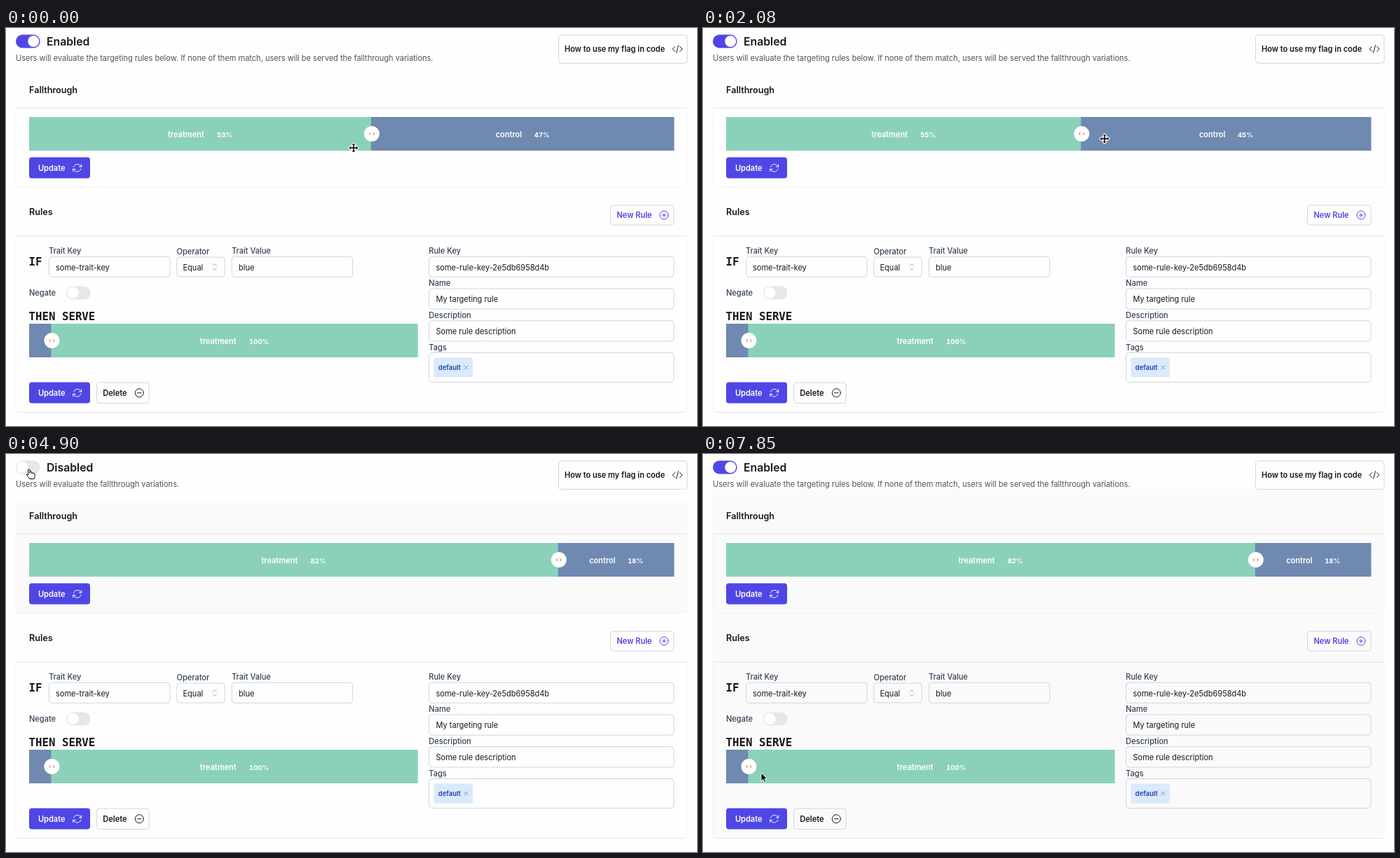
Animation, 986 px wide and 568 px high, one loop 8000 ms. Source, as an HTML page:

```html
<!DOCTYPE html>
<html lang="en">
<head>
<meta charset="utf-8">
<title>Flag targeting</title>
<style>
  html, body { margin: 0; width: 100%; height: 100%; overflow: hidden; background: #fefefe; }
  svg { display: block; }
  text { font: 400 11.03px Inter, sans-serif; fill: #18181b; white-space: pre; }
  .semi { font-weight: 600; }
  .title { font-weight: 600; font-size: 15.75px; }
  .head { font-weight: 600; font-size: 12.6px; }
  .sub { fill: #52525b; }
  .label { font-weight: 500; fill: #334155; }
  .mono { font: 700 15.75px "DejaVu Sans Mono", monospace; }
  .white { font-weight: 600; fill: #fff; }
  .pct { font-weight: 700; font-size: 9.6px; fill: #fff; font-variant-numeric: tabular-nums; }
  .tag { font-weight: 600; font-size: 9.45px; fill: #1e40af; }
  .accent { font-weight: 600; fill: #4f46e5; }
  .field { fill: none; stroke: #d1d5db; }
  .icon { fill: none; stroke-width: 1.5; stroke-linecap: round; stroke-linejoin: round; }
  .green { fill: #8bd1b9; }
  .blue { fill: #6f89b0; }
  .indigo { fill: #4f46e5; }
  .tint { fill: #fafafa; }
  .line { fill: #e5e5e5; }
  .faint { fill: none; stroke: #f1f1f1; }
  .blurred { filter: blur(2px); }
</style>
</head>
<body>
<svg width="986" height="568" viewBox="0 0 986 568">
  <defs>
    <clipPath id="leftClip"><rect id="leftBox" x="33" y="127" height="48"/></clipPath>
    <g id="refresh" class="icon" stroke="#fff" transform="scale(.656) translate(-12 -12)">
      <path d="M16.02 9.35h5M2.98 19.64v-5m0 0h5m-5 0 3.18 3.19a8.25 8.25 0 0 0 13.8-3.7M4.03 9.87a8.25 8.25 0 0 1 13.8-3.7l3.19 3.18m0-5v5"/>
    </g>
    <g id="update">
      <rect class="indigo" x="33" y="184.5" width="87" height="30" rx="4"/>
      <text class="white" x="46" y="204">Update</text>
      <use href="#refresh" x="0" y="0" transform="translate(101.7 199.7)"/>
    </g>
    <g id="thumb">
      <circle r="11" fill="#fff"/>
      <path d="M-2.2-1.9-3.5 0l1.3 1.9M2.2-1.9 3.5 0 2.2 1.9" fill="none" stroke="#f0825f" stroke-width="1.1"/>
    </g>
    <g id="crossCursor" stroke-linejoin="round">
      <path id="crossShape" d="M0-6.5 2.2-4H.8V-.8H4V-2.2L6.5 0 4 2.2V.8H.8V4H2.2L0 6.5-2.2 4H-.8V.8H-4V2.2L-6.5 0-4-2.2V-.8H-.8V-4H-2.2Z" stroke="#fff" stroke-width="2"/>
      <use href="#crossShape" stroke="none"/>
      <path d="M0-6.5 2.2-4H.8V-.8H4V-2.2L6.5 0 4 2.2V.8H.8V4H2.2L0 6.5-2.2 4H-.8V.8H-4V2.2L-6.5 0-4-2.2V-.8H-.8V-4H-2.2Z"/>
    </g>
    <path id="arrowCursor" d="M0 0V11.8L2.7 9.3 4.5 13.3 6.5 12.4 4.8 8.5H8.6Z" stroke="#fff" stroke-width=".9"/>
    <path id="handCursor" d="M-1.2 1C-1.2-.5 1.2-.5 1.2 1V5.3C2-.1 3.7 4.1 3.7 5.6 4.3 4.2 6 4.5 6 6.1 6.8 5.2 8.2 5.7 8.2 7.1V9.5C8.2 11 7.2 12 7 13.5H.5C0 11.7-3 9.3-3.7 7.7-3.9 6.7-2.7 6.4-1.2 8Z" fill="#fff" stroke="#000" stroke-linejoin="round"/>
  </defs>

  <rect width="986" height="568" fill="#fefefe"/>
  <path id="cardTint" class="tint" d="M14 69H972V227H14Z"/>
  <path id="pageTint" class="tint" d="M14 50H972V549H14Z"/>

  <!-- page header -->
  <rect id="ring" x="11.4" y="6.9" width="39.6" height="24" rx="12" fill="#fff" stroke="#4f46e5" stroke-width="1.6"/>
  <rect id="track" x="14" y="9.5" width="34.6" height="19" rx="9.5"/>
  <circle id="knob" cy="19" r="8" fill="#fff"/>
  <text id="state" class="title" x="58" y="24.8"></text>
  <text id="info" class="sub" x="14" y="47"></text>
  <rect x="788.5" y="10" width="183.5" height="40.3" rx="4" fill="#fefefe" stroke="#d1d5db"/>
  <text class="semi" x="797" y="34.3">How to use my flag in code</text>
  <path class="icon" stroke="#18181b" transform="translate(950.2 22.1) scale(.656)" d="M17.25 6.75 22.5 12l-5.25 5.25m-10.5 0L1.5 12l5.25-5.25m7.5-3-4.5 16.5"/>

  <!-- fallthrough card -->
  <path class="faint" d="M14 114V222Q14 227.5 19 227.5H967Q972 227.5 972 222V114"/>
  <text class="head" x="33" y="93">Fallthrough</text>
  <rect class="line" x="14" y="113.5" width="958" height="1"/>
  <rect class="blue" x="33" y="127" width="920.5" height="48"/>
  <rect id="leftFill" class="green" x="33" y="127" height="48"/>
  <g clip-path="url(#leftClip)">
    <g id="leftText"><text class="white" y="156">treatment</text><text id="leftPct" class="pct" x="70" y="155.5"></text></g>
  </g>
  <g id="rightText"><text class="white" y="156">control</text><text id="rightPct" class="pct" x="55" y="155.5"></text></g>
  <use id="split" href="#thumb"/>
  <use href="#update"/>

  <!-- rules card -->
  <g id="rules">
    <path class="faint" d="M14 297V543Q14 548.5 19 548.5H967Q972 548.5 972 543V297"/>
    <rect class="line" x="19" y="548" width="948" height="1"/>
    <text class="head" x="33" y="266.7">Rules</text>
    <rect class="field" x="862.5" y="253" width="90.5" height="28" rx="4"/>
    <text class="accent" x="871.5" y="271">New Rule</text>
    <path class="icon" stroke="#4f46e5" style="stroke-width:1" d="M945 267a6 6 0 1 1-12 0a6 6 0 0 1 12 0M936.3 267h5.4M939 264.3v5.4"/>
    <rect class="line" x="14" y="296.5" width="958" height="1"/>

    <text class="mono" x="32.5" y="339">IF</text>
    <text class="label" x="61" y="322.4">Trait Key</text>
    <rect class="field" x="61.5" y="326.3" width="172.5" height="29" rx="4"/>
    <text x="71" y="345.5">some-trait-key</text>
    <text class="label" x="243.5" y="323">Operator</text>
    <rect class="field" x="243.8" y="327" width="68.4" height="28" rx="4"/>
    <text x="252.5" y="345.5">Equal</text>
    <path class="icon" stroke="#9ca3af" transform="translate(290.1 333.1) scale(.656)" d="M8.25 15 12 18.75 15.75 15m-7.5-6L12 5.25 15.75 9"/>
    <text class="label" x="322" y="322.4">Trait Value</text>
    <rect class="field" x="322.3" y="326.3" width="172.4" height="29" rx="4"/>
    <text x="332" y="345.5">blue</text>

    <text class="label" x="33" y="382.3">Negate</text>
    <rect x="86" y="368.5" width="34.6" height="19" rx="9.5" fill="#e5e7eb"/>
    <circle cx="95.5" cy="378" r="8" fill="#fff"/>

    <text class="mono" x="32.5" y="417">THEN SERVE</text>
    <rect class="blue" x="33" y="422" width="32" height="48"/>
    <rect class="green" x="64.4" y="422" width="523.3" height="48"/>
    <text class="white" x="276.8" y="451">treatment</text>
    <text class="pct" x="347" y="450.5">100%</text>
    <use href="#thumb" x="65.4" y="446"/>
    <use href="#update" y="321"/>
    <rect class="field" x="129.5" y="506" width="74.7" height="29.5" rx="4"/>
    <text class="semi" x="138.3" y="525">Delete</text>
    <path class="icon" stroke="#18181b" style="stroke-width:1" d="M196.3 520.7a6 6 0 1 1-12 0a6 6 0 0 1 12 0M187.6 520.7h5.4"/>

    <text class="label" x="603.3" y="322.4">Rule Key</text>
    <rect class="field" x="603.7" y="326.3" width="349.3" height="29" rx="4"/>
    <text x="613.5" y="345.5">some-rule-key-2e5db6958d4b</text>
    <text class="label" x="603.3" y="368.2">Name</text>
    <rect class="field" x="603.7" y="372" width="349.3" height="29.2" rx="4"/>
    <text x="613.5" y="391">My targeting rule</text>
    <text class="label" x="603.3" y="414">Description</text>
    <rect class="field" x="603.7" y="417.8" width="349.3" height="29.2" rx="4"/>
    <text x="613.5" y="437">Some rule description</text>
    <text class="label" x="603.3" y="459.7">Tags</text>
    <rect class="field" x="603.7" y="463.5" width="349.3" height="42" rx="4"/>
    <rect x="610.5" y="470.5" width="55.5" height="28" rx="2" fill="#dbe9fd"/>
    <text class="tag" x="616.8" y="488">default</text>
    <path class="icon" stroke="#7d8fb5" style="stroke-width:1" d="M654 482l5 5m0-5l-5 5"/>
  </g>

  <use id="cursor"/>
</svg>
<script>
  const LOOP = 8000, TICKS = 54, TICK = LOOP / TICKS;
  const LEFT = 33, WIDTH = 920.5;
  const $ = id => document.getElementById(id);
  const set = (id, attrs) => {
    for (const name in attrs) $(id).setAttribute(name, attrs[name]);
  };
  const show = (id, on) => { $(id).style.display = on ? "" : "none"; };
  const within = (n, from, to) => n >= from && n < to;

  // [tick, share of treatment]
  const share = [[0, 53], [4, 21], [6, 10], [8, 6], [9, 6], [11, 19], [14, 55], [16, 71], [18, 80], [19, 82]];
  // [tick, x, y]
  const pointer = [
    [0, 496, 171], [4, 190, 158], [6, 103, 150], [8, 74, 144], [9, 80, 144], [11, 250, 148],
    [14, 573, 158], [16, 710, 160], [19, 792, 153], [20, 740, 140], [21, 560, 110], [22, 340, 76],
    [23, 170, 50], [24, 71, 35], [25, 42, 25], [26, 35, 22], [33, 33, 22], [35, 28, 20],
    [43, 28, 20], [44, 31, 29], [46, 48, 80], [48, 67, 155], [50, 98, 374], [51, 97, 408],
    [52, 88, 438], [53, 83, 455]
  ];

  function at(keys, n) {
    let i = keys.findIndex(key => key[0] > n);
    if (i < 0) return keys[keys.length - 1].slice(1);
    const a = keys[i - 1], b = keys[i], f = (n - a[0]) / (b[0] - a[0]);
    return a.slice(1).map((v, j) => v + (b[j + 1] - v) * f);
  }

  function drawSlider(n) {
    const pct = Math.round(at(share, n)[0]);
    const w = WIDTH * pct / 100, x = LEFT + w;
    set("leftFill", { width: w });
    set("leftBox", { width: w });
    set("leftText", { transform: `translate(${LEFT + Math.max(24, w / 2 - 46)} 0)` });
    set("rightText", { transform: `translate(${x + Math.max(24, (WIDTH - w) / 2 - 38.5)} 0)` });
    set("split", { x: x + 1, y: 151 });
    $("leftPct").textContent = pct + "%";
    $("rightPct").textContent = 100 - pct + "%";
  }

  function drawToggle(n) {
    const off = within(n, 29, 40);
    set("track", { fill: off ? "#e5e7eb" : "#4f46e5" });
    set("knob", { cx: off ? 23.5 : 39.2 });
    show("ring", within(n, 27, 31) || within(n, 39, 41));
    $("state").textContent = off ? "Disabled" : "Enabled";
    $("info").textContent = off
      ? "Users will evaluate the fallthrough variations."
      : "Users will evaluate the targeting rules below. If none of them match, users will be served the fallthrough variations.";
  }

  function drawCursor(n) {
    const [x, y] = at(pointer, n);
    const shape = n < 20 ? "cross" : within(n, 25, 44) ? "hand" : "arrow";
    set("cursor", { href: `#${shape}Cursor`, x, y });
  }

  function draw(now) {
    const n = Math.floor((now % LOOP + 12) / TICK) % TICKS;
    drawSlider(n);
    drawToggle(n);
    drawCursor(n);
    show("cardTint", n >= 25);
    show("pageTint", n >= 35);
    $("rules").classList.toggle("blurred", within(n, 35, 50));
  }

  const start = performance.now();
  function frame() {
    draw(performance.now() - start);
    requestAnimationFrame(frame);
  }
  frame();
</script>
</body>
</html>
```
